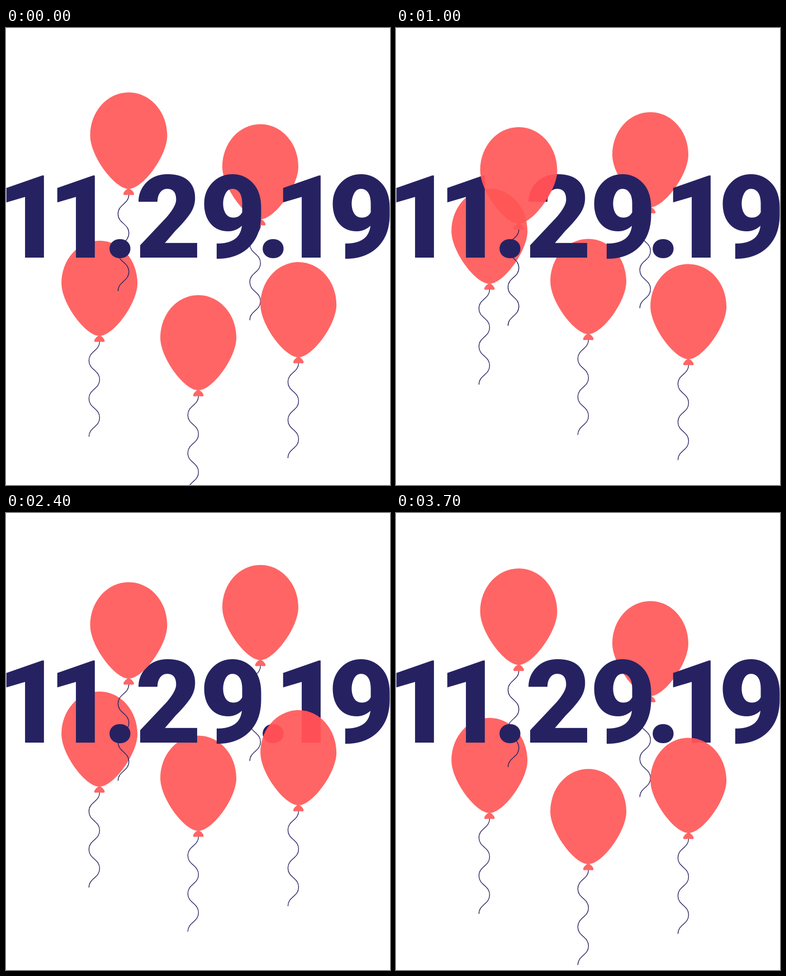
These frames come from a looping animation (687 by 816 pixels, 3800 ms). An HTML page:

```html
<!DOCTYPE html>
<html lang="en">
<head>
<meta charset="utf-8">
<title>11.29.19</title>
<style>
  html, body { margin: 0; width: 100%; height: 100%; overflow: hidden; background: #fff; }
  svg { display: block; width: 687px; height: 816px; }
  .date { font: 900 205.5px Roboto, sans-serif; fill: #262262; }
  .glow { fill: #f00; mix-blend-mode: screen; }
  .skin { fill: #f55; opacity: .9; }
  .string { fill: none; stroke: #262262; stroke-width: 1.3; }
</style>
</head>
<body>
<svg viewBox="0 0 687 816">
  <defs>
    <path id="shape" d="M0 0C38 0 68 34 68 76C68 112 25 170 0 170C-25 170-68 112-68 76C-68 34-38 0 0 0Z
      M0 168.5Q8.5 173.5 9.4 178.8Q9.3 181 6.5 180.7Q0 180-6.5 180.7Q-9.3 181-9.4 178.8Q-8.5 173.5 0 168.5Z"/>
    <g id="balloon">
      <path class="string" d="M.3 180C.3 197-18.8 197-18.8 214S.3 231 .3 248S-18.8 265-18.8 282S.3 299 .3 316S-18.8 333-18.8 350"/>
      <use class="glow" href="#shape"/>
      <use class="skin" href="#shape"/>
    </g>
  </defs>
  <rect width="687" height="816" fill="#fff"/>
  <use id="left" href="#balloon"/>
  <use id="middle" href="#balloon"/>
  <use id="upper" href="#balloon"/>
  <text class="date" y="410">11.29.19</text>
  <use id="right" href="#balloon"/>
  <use id="top" href="#balloon"/>
</svg>
<script>
const LOOP = 3800, HALF = LOOP / 2, STEP = 100;

// low: resting height, fall: slow drift above it, back: sharpness of the return,
// bob: size of the swing (two per loop), lag: its delay in ms.
const balloons = {
  left:   { x: 167.2, low: 318, fall: 21,  back: 13,  bob: 41,  lag: 30 },
  middle: { x: 344.1, low: 401, fall: 35,  back: 13,  bob: 41,  lag: 0 },
  upper:  { x: 455,   low: 82,  fall: 109, back: 2.5, bob: -20, lag: -80 },
  right:  { x: 523.2, low: 362, fall: 78,  back: 6,   bob: -25, lag: 150 },
  top:    { x: 219.5, low: 120, fall: 36,  back: 13,  bob: -41, lag: 0, scale: 1.0135 }
};

function height({ low, fall, back, bob, lag }, t) {
  const drift = t < HALF
    ? (1 + Math.cos(Math.PI * t / HALF)) / 2
    : ((t - HALF) / HALF) ** back;
  return low + fall * drift + bob * Math.cos(2 * Math.PI * (t - lag) / HALF);
}

// Tight kerning: each character's ink is centred on its own spot.
function placeDate() {
  const centres = [34, 125, 204, 289.5, 405.5, 478, 529, 635.5];
  const text = document.querySelector('.date');
  const pen = document.createElement('canvas').getContext('2d');
  pen.font = '900 205.5px Roboto, sans-serif';
  const xs = [...text.textContent].map((char, i) => {
    const ink = pen.measureText(char);
    return centres[i] + (ink.actualBoundingBoxLeft - ink.actualBoundingBoxRight) / 2;
  });
  text.setAttribute('x', xs.join(' '));
}

function draw(ms) {
  const t = Math.floor(ms % LOOP / STEP) * STEP;
  for (const [id, b] of Object.entries(balloons)) {
    const y = height(b, t).toFixed(2);
    document.getElementById(id)
      .setAttribute('transform', `translate(${b.x} ${y}) scale(${b.scale || 1})`);
  }
}

placeDate();
draw(0);
const start = performance.now();
function tick() {
  draw(performance.now() - start);
  requestAnimationFrame(tick);
}
requestAnimationFrame(tick);
</script>
</body>
</html>
```
